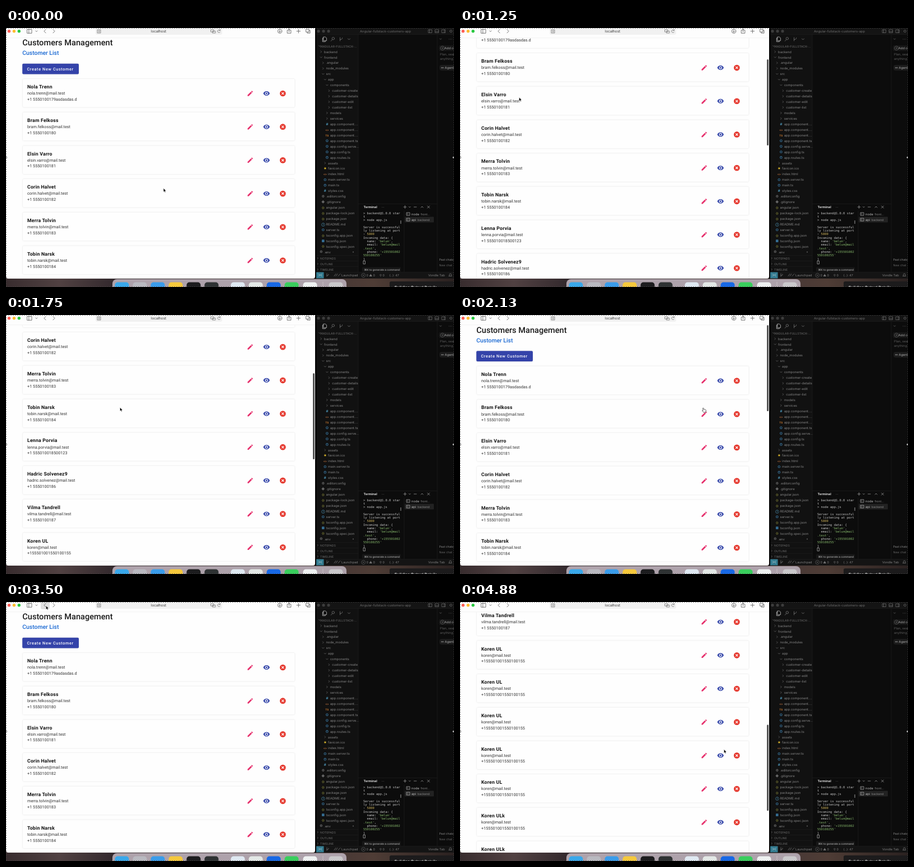
Write an HTML page that moves like this. It is 800 px wide and 463 px high and loops after 5.01 s.

```html
<!DOCTYPE html>
<html lang="en">
<head>
<meta charset="utf-8">
<title>Customers Management</title>
<style>
html, body { margin: 0; width: 100%; height: 100%; overflow: hidden; background: #000; }
svg { display: block; width: 100vw; height: 100vh; }
text { white-space: pre; text-rendering: geometricPrecision; font-family: Inter, sans-serif; }
.page text { font-family: Roboto, sans-serif; }
.term text { font-family: "DejaVu Sans Mono", monospace; }
.card { fill: #fefefe; filter: drop-shadow(0 .6px .9px #0002); }
.line { fill: none; stroke-width: .8; stroke-linecap: round; stroke-linejoin: round; }
</style>
</head>
<body>
<svg id="stage" viewBox="0 0 800 463" preserveAspectRatio="none">
  <defs>
    <linearGradient id="wall">
      <stop offset="0" stop-color="#382c2e"/><stop offset=".12" stop-color="#514142"/>
      <stop offset=".24" stop-color="#33292d"/><stop offset=".7" stop-color="#453635"/>
      <stop offset=".82" stop-color="#4f3d36"/><stop offset="1" stop-color="#2a2120"/>
    </linearGradient>
    <clipPath id="view"><path d="M0 18H552V444Q552 448 548 448H4Q0 448 0 444Z"/></clipPath>
    <g id="edit"><path d="M3 17.25V21h3.75L17.81 9.94l-3.75-3.75zM20.71 7.04a1 1 0 0 0 0-1.41l-2.34-2.34a1 1 0 0 0-1.41 0l-1.83 1.83 3.75 3.75z" fill="#e6316d"/></g>
    <g id="eye"><path d="M12 4.5C7 4.5 2.73 7.61 1 12c1.73 4.39 6 7.5 11 7.5s9.27-3.11 11-7.5C21.27 7.61 17 4.5 12 4.5z" fill="#3446a9"/><circle cx="12" cy="12" r="4" fill="#3446a9" stroke="#fff" stroke-width="2"/></g>
    <g id="remove"><circle cx="12" cy="12" r="10.2" fill="#e5392f"/><path d="M8 8l8 8M16 8l-8 8" stroke="#fff" stroke-width="2.2"/></g>
  </defs>
  <rect width="800" height="463" fill="url(#wall)"/>
  <g id="dock"></g>
  <g id="ide"></g>
  <rect x="551" width="3" height="448" fill="#000"/>
  <g class="page">
    <path d="M0 0H552V444Q552 448 548 448H4Q0 448 0 444Z" fill="#fefefe"/>
    <g clip-path="url(#view)">
      <g id="list"></g>
      <rect id="thumb" x="548" width="3" height="154" rx="1.5" fill="#555"/>
    </g>
    <g id="bar"></g>
  </g>
  <path d="M0 .5H800M.5 0V463M799.5 0V463M0 462.5H800" stroke="#444" stroke-opacity=".6" stroke-dasharray="2 2" fill="none"/>
  <g fill="#ccc" stroke="#555" stroke-width=".5"><circle cx=".5" cy="231.5" r="1.4"/><circle cx="799" cy="231.5" r="1.4"/></g>
  <g id="pointer" stroke-linejoin="round">
    <path id="arrow" d="M0 0V6.6L1.5 5.2 2.5 7.4 3.7 6.9 2.7 4.7H4.7Z" fill="#000" stroke="#fff" stroke-width=".5"/>
    <path id="hand" d="M0 .6Q.8-.4 1.5.7L2 2.6 5 3.2Q6 3.6 5.8 5L5.2 8H1.4L-1.2 5Q-1 4 .7 4.6Z" fill="#fff" stroke="#222" stroke-width=".7"/>
  </g>
</svg>
<script>
const $ = id => document.getElementById(id);
const esc = s => s.replace(/&/g, '&amp;').replace(/</g, '&lt;');
const text = (x, y, s, size, fill, more = '') =>
  `<text x="${x}" y="${y}" font-size="${size}" fill="${fill}" ${more}>${esc(s)}</text>`;
const rect = (x, y, w, h, fill, r = 0) =>
  `<rect x="${x}" y="${y}" width="${w}" height="${h}" rx="${r}" fill="${fill}"/>`;
const dot = (x, y, r, fill) => `<circle cx="${x}" cy="${y}" r="${r}" fill="${fill}"/>`;
const line = (d, stroke) => `<path class="line" d="${d}" stroke="${stroke}"/>`;
const bold = 'font-weight="700"', medium = 'font-weight="500"', middle = 'text-anchor="middle"';

// Customer list
const PITCH = 59.7;
const people = [
  ['Nola Trenn', '+1 5550100179asdasdas.d'],
  ['Bram Felkoss', '+1 5550100180'],
  ['Elsin Varro', '+1 5550100181'],
  ['Corin Halvet', '+1 5550100182'],
  ['Merra Tolvin', '+1 5550100183'],
  ['Tobin Narsk', '+1 5550100184'],
  ['Lenna Porvia', '+1 555010018500123'],
  ['Hadric Solvenez9', '+1 5550100186'],
  ['Vilma Tandrell', '+1 5550100187']
];
for (let i = 0; i < 10; i++) people.push([i < 5 ? 'Koren UL' : 'Koren ULk', '+155501001550100155']);

const mailOf = name => name.replace(/ UL.*|\d/g, '').replace(' ', '.').toLowerCase() + '@mail.test';
const card = ([name, phone], i) => `<g transform="translate(0 ${91 + i * PITCH})">
  <rect class="card" x="30" width="485.5" height="50.5" rx="2"/>
  ${text(38, 17.3, name, 8.7, '#111', bold + ' letter-spacing=".22"')}
  ${text(38, 28.4, mailOf(name), 7.3, '#333')}
  ${text(38, 39.1, phone, 7.3, '#333')}
  ${['edit', 'eye', 'remove'].map((id, n) =>
    `<use href="#${id}" transform="translate(${429.8 + n * 29.1} 19.7) scale(.525)"/>`).join('')}
</g>`;
$('list').innerHTML =
  text(29.3, 31.4, 'Customers Management', 14.6, '#1b1b1b', medium) +
  text(29.3, 48.4, 'Customer List', 10.4, '#1767d2', medium) +
  `<rect class="card" x="29.2" y="63.7" width="100.8" height="18.8" rx="2" style="fill:#3443a9"/>` +
  text(37.5, 75.6, 'Create New Customer', 7.28, '#fff', medium + ' letter-spacing=".63"') +
  people.map(card).join('');

// Browser toolbar
$('bar').innerHTML = rect(0, 0, 552, 18, '#fdfdfd') + rect(0, 17.6, 552, .5, '#e8e8e8') +
  rect(160, -4, 226, 16, '#f1f1f1', 3) +
  `<g id="back">${rect(62, -1, 16, 14, '#dedede', 3)}</g>` +
  ['#fe5f57', '#febc2e', '#28c840'].map((c, i) => dot(5.5 + i * 8.9, 5.7, 2.7, c)).join('') +
  line('M38 2.5H46V9.3H38ZM40.8 2.5V9.3M52.8 5l1.6 1.6L56 5M71 2.5l-3 3.2 3 3.2M84 2.5l3 3.2-3 3.2', '#555') +
  line('M163.5 3H169V9H163.5ZM165 5h2.5M165 7h2.5M366 3h5v4h-5zM369 5.5h5v3.5h-5zM382.3 4.2a2.5 2.5 0 1 0 .2 2.8M382.5 2.7v1.8h-1.8', '#777') +
  line('M489 3.5v4M487.4 6l1.6 1.6L490.6 6M492.7 5.7a3.7 3.7 0 1 1-7.4 0a3.7 3.7 0 1 1 7.4 0M504 4h-1.8v5.3h6.6V4H507M505.5 7V1.5M503.9 3l1.6-1.6L507.1 3M519 5.7h6.6M522.3 2.4V9M536 2.2h5v5h-5zM538 7.2v2h5v-5h-2', '#555') +
  text(272.5, 8.2, 'localhost', 6.4, '#333', middle + ' style="font-family:Inter,sans-serif"');

// Dock
const tiles = [[207, '#39a8ea'], [239, '#b9b9c0'], [271, '#3a9cea'], [303, '#f5c83c'], [335, '#1c1c1e'],
  [367, '#2e3233'], [414, '#dfe9f2'], [446, '#e3e8e6'], [478, '#1768e5'], [510, '#39ce5d'], [543, '#eef1f1'], [589, '#c9c8ca']];
$('dock').innerHTML = rect(190, 449, 418, 24, '#aea2ab', 8) +
  tiles.map(([x, c]) => rect(x - 12.5, 454.5, 25, 25, c, 5)).join('') +
  line('M566 454V463', '#ccc6cb') +
  rect(685, 453, 120, 14, '#1c1b1c', 3) +
  text(694, 465.6, 'Building Output Details', 6.8, '#ddd', bold);

// Editor: depth, icon, label
const tree = `0 > backend|0 v frontend|1 > .angular|1 > node_modules|1 v src|2 v app|3 v components
4 > customer-create|4 > customer-details|4 > customer-edit|4 > customer-list|3 > models|3 > services
3 # app.component.…|3 <> app.component.…|3 TS app.component.…|3 o app.component.ts|3 o app.config.serve…
3 o app.config.ts|3 o app.routes.ts|2 > assets|2 ★ favicon.ico|2 <> index.html|2 o main.server.ts|2 o main.ts
2 # styles.css|1 ⚙ .editorconfig|1 ◆ .gitignore|1 {} angular.json|1 {} package-lock.json|1 {} package.json
1 ⓘ README.md|1 o server.ts|1 {} tsconfig.app.json|1 s tsconfig.json|1 {} tsconfig.spec.json|0 ⚙ .env`.split(/[|\n]/);
const tint = { '#': '#4d94b5', '<>': '#c07340', TS: '#c87930', '★': '#d9b52d', '{}': '#a3a443', 'ⓘ': '#4d94b5' };

function treeRow(row, i) {
  const [depth, icon, label] = row.split(' ');
  const x = 568 + depth * 3.55, y = 42.5 + i * 9.945, left = x - 5.3;
  const mark = icon === '>' ? line(`M${left - .8} ${y - 1.6}l1.6 1.6-1.6 1.6`, '#666')
    : icon === 'v' ? line(`M${left - 1.6} ${y - .8}l1.6 1.6 1.6-1.6`, '#666')
    : icon === 'o' ? `<circle cx="${left}" cy="${y}" r="1.8" fill="none" stroke="#356c91" stroke-width="1.1"/>`
    : icon === 's' ? rect(left - 2.3, y - 2.3, 4.6, 4.6, '#356c91', .6)
    : text(left, y + 1.9, icon, icon.length > 1 ? 4.6 : 6, tint[icon] || '#666', middle + ' ' + bold);
  return mark + text(x, y + 2.1, label, 5.85, '#858585');
}

const GREEN = '#87b96c', GRAY = '#c4c4c4', CELL = 3.3;
const output = ['> backend@1.0.0 star', 't', '> node app.js', '', 'Server is successful', 'ly listening at port',
  ': 5800', 'Incoming data: {', "  name: 'belun',", "  email: 'belun@mail", ".test',", "  phone: '+155501002", "550100255'", '}'];
const strings = { 6: [2, '5800', '#cfb45c'], 8: [8, "'belun'", GREEN], 9: [9, "'belun@mail", GREEN],
  10: [0, ".test'", GREEN], 11: [9, "'+155501002", GREEN], 12: [0, "550100255'", GREEN] };

function outputRow(s, i) {
  const y = 332.5 + i * 6.32, part = strings[i];
  const put = (col, s, fill) => text(638 + col * CELL, y, s, CELL / .602, fill, medium);
  if (!part) return put(0, s, GRAY);
  const [col, word, fill] = part, end = col + word.length;
  return put(0, s.slice(0, col), GRAY) + put(col, word, fill) + put(end, s.slice(end), GRAY);
}

$('ide').innerHTML = rect(553, 0, 247, 447.5, '#0c0c0c') + rect(553, 0, 247, 11.5, '#141414') +
  rect(553, 11.5, 76, 425, '#111') + rect(553, 436.5, 247, 11, '#141414') +
  line('M553 11.5H800M629 11.5V436M770 11.5V436M629 314.5H770M553 406.5H629M553 416.5H629M553 426.5H629M553 436.5H800', '#1c1c1c') +
  [558, 567, 576].map(x => dot(x, 5.7, 2.6, '#3c3c3c')).join('') +
  text(677.5, 7.8, 'Angular-fullstack-customers-app', 5.8, '#6c6c6c', middle) +
  line('M754.5 3h6v5.5h-6zM756.5 3v5.5M766.5 3h6v5.5h-6zM766.5 6.5h6M778.5 3h6v5.5h-6zM782.5 3v5.5M792.5 5.7a2 2 0 1 0 4 0a2 2 0 1 0-4 0', '#666') +
  line('M567 16h3.5l2 2v4.7H567ZM567 18h-1.7v6.5h5V23', '#bbb') +
  line('M586.5 18.8a2.2 2.2 0 1 1-4.4 0a2.2 2.2 0 1 1 4.4 0M582.7 20.6l-2.4 2.8M596.5 17v6M600.5 17.5v1q0 2-4 2.3M610.5 19l2 2 2-2', '#777') +
  line('M558.5 31.5l1.4 1.4 1.4-1.4M774.5 19l1.5 1.5 1.5-1.5M791 20h.1M793.5 20h.1M796 20h.1', '#666') +
  text(561, 34.8, 'ANGULAR-FULLSTACK-…', 5.3, '#606060', medium) +
  tree.map(treeRow).join('') + dot(620, 400.5, 1, '#666') +
  ['NOTEPADS', 'OUTLINE', 'TIMELINE'].map((s, i) =>
    text(561, 413.6 + i * 10, s, 5.2, '#606060', medium) +
    line(`M556 ${410.2 + i * 10}l1.4 1.4-1.4 1.4`, '#606060')).join('') +
  rect(773, 31, 32, 10, '#171717', 2) + text(775.5, 38.2, '⊕', 5.5, '#888') + text(783, 38.2, 'Add context', 5.7, '#aaa') +
  text(775, 49, 'Plan, search, build', 5.7, '#5c5c5c') + text(775, 57, 'anything', 5.7, '#5c5c5c') +
  rect(774, 66, 32, 10, '#1c1c1c', 4) + text(776.5, 73, '∞', 6, '#999') + text(783.5, 73, 'Agent', 5.7, '#aaa') +
  text(773.5, 415.6, 'Past chats', 5.2, '#8c8c8c') + text(773.5, 425.6, 'New chat', 5.2, '#666') +
  text(638.5, 322.2, 'Terminal', 5.7, '#ddd', bold) + text(670.5, 321, '…', 6, '#888') +
  line('M710 320h5M712.5 317.5v5M719.5 319.4l1.4 1.4 1.4-1.4M728.5 320h4.5M741 321l2-2 2 2M752.5 318l4 4M756.5 318l-4 4', '#999') +
  rect(712, 337.6, 52, 10, '#222', 1) +
  [[332.5, 'node', 'front…', 740.5], [342.6, 'api', 'backend', 735]].map(([y, name, dir, x]) =>
    line(`M715.5 ${y - 2.5}h5.5v5h-5.5zM717 ${y - 1}l1 1-1 1`, '#aaa') +
    text(724, y + 2, name, 5.8, '#bbb') + text(x, y + 2, dir, 5.3, '#888')).join('') +
  line('M711 327V436', '#1c1c1c') + rect(704, 344, 2, 6, '#555') +
  `<g class="term">${output.map(outputRow).join('')}</g>` +
  line('M638.4 416.3h3v5.6h-3z', '#aaa') +
  rect(636, 427.5, 69, 8, '#171717', 1) + text(639.5, 433.7, '⌘K to generate a command', 4.8, '#aaa', medium) +
  rect(553.5, 436.5, 14, 11, '#347c91') +
  line('M558.5 440l1.7 1.7-1.7 1.7M563.5 440l-1.7 1.7 1.7 1.7', '#ddd') +
  line('M573 439v5M576 440v1q0 1.5-3 2M586 443.5l3-4M589 443.5l3-4M593 443.5l4-4', '#777') +
  text(599, 443.9, 'Launchpad', 5.6, '#808080') + text(634.5, 443.9, '⊗ 0 ⚠ 0', 5.4, '#808080') +
  text(667, 443.9, '⚲ 0', 5.4, '#808080') + text(684.5, 443.9, '{..}: 47', 5.4, '#808080') +
  text(754, 443.9, 'Vondle Tab', 5.6, '#808080') +
  line('M791 443.5h5l-.8-1.2v-1.5a1.7 1.7 0 0 0-3.4 0v1.5z', '#777');

// Motion: step number followed by values
const STEP = 125, LAST = 39, LOOP = 5010;
const path = [[0, 281.2, 286.5], [7, 75.5, 49.3], [9, 100, 110], [12, 121.5, 164.3], [13, 123, 165],
  [16, 433.5, 166], [20, 433.5, 166], [27, 71.5, 6.8], [30, 71.5, 6.8], [34, 471.3, 263.5]];
const scroll = [[9, 0], [12, 317], [13, 360], [16, -3], [17, -.5], [18, 0], [34, 0], [35, 25], [36, 113], [39, 559]];

function at(keys, k, ease = u => u) {
  const i = keys.findIndex(key => key[0] > k);
  if (i < 0) return keys[keys.length - 1].slice(1);
  if (i === 0) return keys[0].slice(1);
  const a = keys[i - 1], b = keys[i], u = ease((k - a[0]) / (b[0] - a[0]));
  return a.slice(1).map((v, n) => v + (b[n + 1] - v) * u);
}
const smooth = u => u * u * (3 - 2 * u);
const show = (id, on) => $(id).setAttribute('visibility', on ? 'visible' : 'hidden');
const move = (id, x, y) => $(id).setAttribute('transform', `translate(${x} ${y})`);

function draw(now) {
  const k = Math.min(LAST, Math.floor(now % LOOP / STEP));
  const [x, y] = at(path, k, smooth), [top] = at(scroll, k);
  const hand = k >= 16 && k <= 20;
  move('pointer', x, y);
  move('list', 0, -top);
  move('thumb', 0, 18 + Math.max(0, top) * .36);
  show('thumb', k > 9 && k < 21 || k > 34);
  show('hand', hand);
  show('arrow', !hand);
  show('back', y < 13 && x > 62 && x < 78);
}

let start;
function tick(now) {
  start ??= now;
  draw(now - start);
  requestAnimationFrame(tick);
}
draw(0);
requestAnimationFrame(tick);
</script>
</body>
</html>
```
